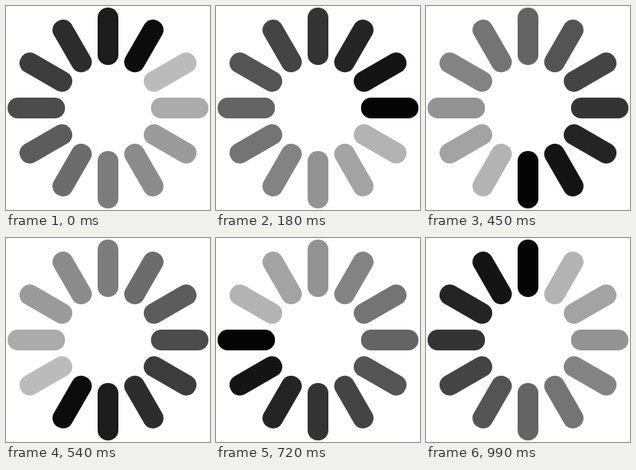
These frames come from a looping animation (256x256 px, 1080 ms). An HTML page:

```html
<!DOCTYPE html>
<html lang="en">
<head>
<meta charset="utf-8">
<title>Spinner</title>
<style>
html, body { margin: 0; height: 100%; overflow: hidden; background: #fff; }
svg { display: block; width: 100vw; height: 100vh; }
</style>
</head>
<body>
<svg viewBox="0 0 256 256"></svg>
<script>
const COUNT = 12, STEP = 90;
const svg = document.querySelector('svg');

const bars = Array.from({ length: COUNT }, (_, i) => {
  const bar = document.createElementNS(svg.namespaceURI, 'rect');
  const attrs = { x: 115, y: 2, width: 26, height: 72, rx: 12.5,
    transform: `rotate(${i * 360 / COUNT} 128 128)` };
  for (const name in attrs) bar.setAttribute(name, attrs[name]);
  return svg.appendChild(bar);
});

function draw(now) {
  const step = Math.floor(now / STEP) % COUNT;
  // The fade runs on a finer clock, so its phase cycles every three steps.
  const head = step + 1.75 - 0.25 * (step % 3);
  bars.forEach((bar, i) => {
    const age = (head - i + COUNT) % COUNT;
    const grey = Math.round(age / COUNT * 191.25);
    bar.setAttribute('fill', `rgb(${grey},${grey},${grey})`);
  });
}

const start = performance.now();
function tick() {
  draw(performance.now() - start);
  requestAnimationFrame(tick);
}
tick();
</script>
</body>
</html>
```
